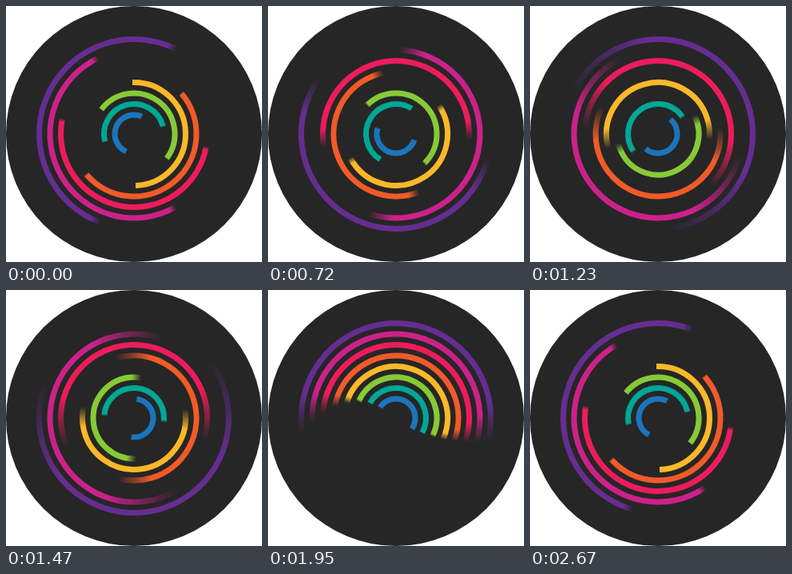
Write an HTML page with a canvas that moves like this. It is 320x320 px and loops after 2700 ms.

```html
<!DOCTYPE html>
<html>
<head>
<meta charset="utf-8">
<style>
  html, body { margin: 0; width: 100%; height: 100%; overflow: hidden; background: #fff; }
  canvas { display: block; }
</style>
</head>
<body>
<canvas id="stage" width="320" height="320"></canvas>
<script>
const ctx = document.getElementById('stage').getContext('2d');
const STEP = 30, STEPS = 90, CENTER = 160, SHUTTER = 1.1;
const RAD = Math.PI / 180;

// Ring colours from the innermost outwards
const COLORS = [
  [27, 117, 188], [0, 167, 150], [134, 202, 54], [251, 184, 41],
  [241, 90, 41], [237, 28, 92], [204, 33, 138], [102, 45, 145]
];

// Half of the symmetric ease: 0..1, steep towards 1
const ramp = q => (q + q * q + q ** 4.6) / 3;

// Angle between neighbouring rings, in degrees
function twist(n) {
  const x = n / STEPS;
  const turns = Math.floor(x), p = x - turns;
  const eased = p < 0.5 ? ramp(2 * p) / 2 : 1 - ramp(2 - 2 * p) / 2;
  return 51.4 + 360 * (turns + eased);
}

const ringAngle = (i, n) => 204 - 4 * n + i * twist(n);

// Half ring whose ends fade over the angle travelled while the shutter is open
function drawRing(i, n) {
  const mid = ringAngle(i, n);
  const travel = ringAngle(i, n + 0.5) - ringAngle(i, n - 0.5);
  const blur = Math.max(0.5, Math.abs(travel) * SHUTTER);
  const span = 180 + blur;
  const start = (mid - span / 2) * RAD;
  const rgb = COLORS[i].join();
  const solid = `rgb(${rgb})`, clear = `rgba(${rgb},0)`;

  const fade = ctx.createConicGradient(start, CENTER, CENTER);
  fade.addColorStop(0, clear);
  fade.addColorStop(blur / 360, solid);
  fade.addColorStop(0.5, solid);
  fade.addColorStop(span / 360, clear);

  ctx.strokeStyle = fade;
  ctx.beginPath();
  ctx.arc(CENTER, CENTER, 24 + 13.5 * i, start, start + span * RAD);
  ctx.stroke();
}

function draw() {
  const n = Math.floor(performance.now() / STEP) % STEPS;
  ctx.clearRect(0, 0, 320, 320);
  ctx.fillStyle = '#262626';
  ctx.beginPath();
  ctx.arc(CENTER, CENTER, 160, 0, 2 * Math.PI);
  ctx.fill();
  ctx.lineWidth = 7;
  COLORS.forEach((_, i) => drawRing(i, n));
  requestAnimationFrame(draw);
}
draw();
</script>
</body>
</html>
```
